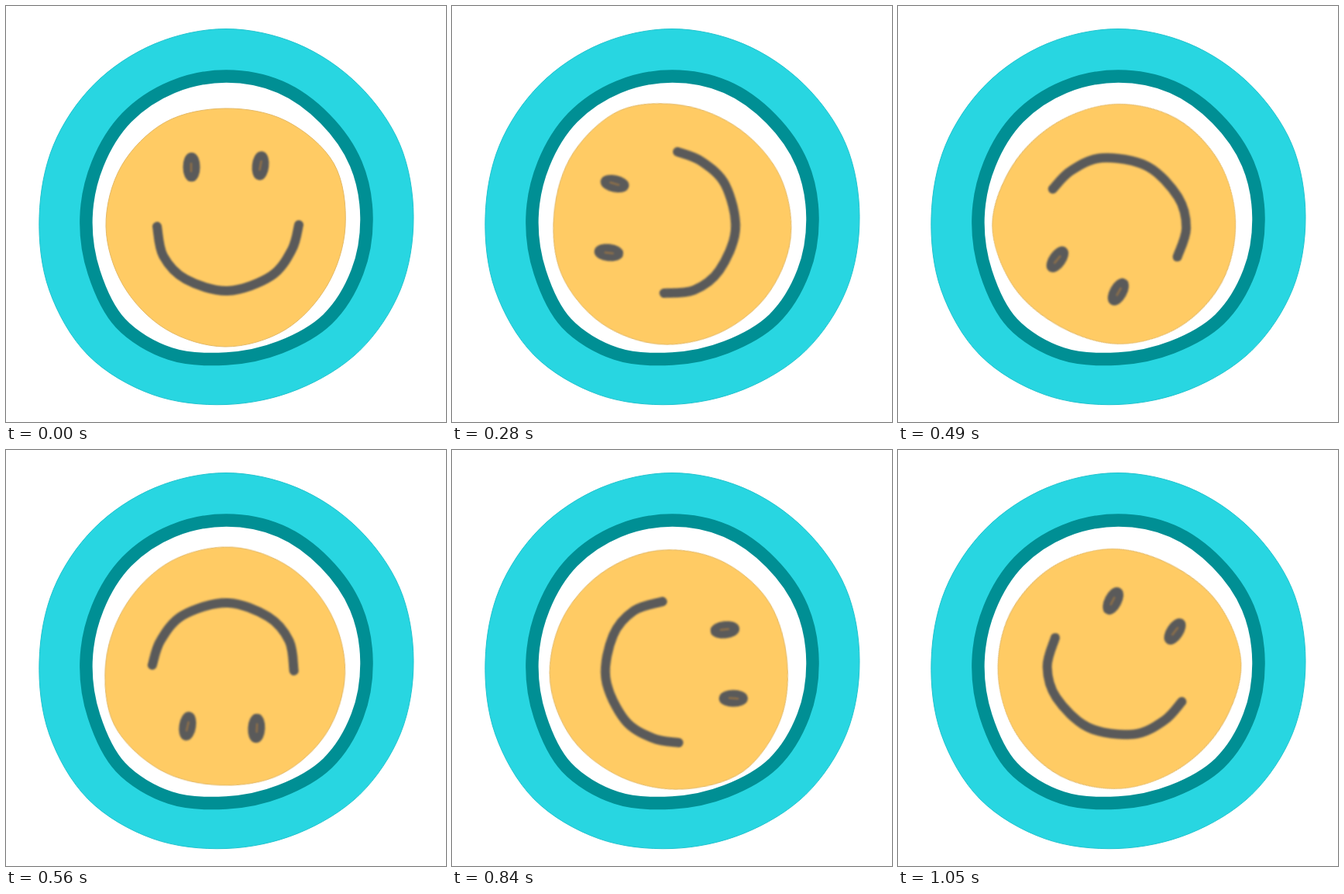
These frames come from a looping animation (568x536 px, 1120 ms). An HTML page:

```html
<!DOCTYPE html>
<html lang="en">
<head>
<meta charset="utf-8">
<title>Rolling smiley</title>
<style>
  html, body { margin: 0; width: 100%; height: 100%; overflow: hidden; background: #fff; }
  svg { display: block; }
  .soft { filter: blur(.8px); }
  #mouth, .eye { fill: none; stroke: #5a5a5a; stroke-width: 12; stroke-linecap: round; stroke-linejoin: round; }
  .eye { fill: #5a5a5a; stroke-width: 10.5; }
  .glint { fill: none; stroke: #8f7049; stroke-width: 2.6; stroke-linecap: round; }
  #face { animation: roll 1120ms infinite; }

  /* key poses of the wobbling turn; each stretch is held in 70 ms steps */
  @keyframes roll {
    0%     { transform: translate(283px, 284px) rotate(0deg); animation-timing-function: steps(2); }
    12.5%  { transform: translate(282.2px, 284.1px) rotate(-30.7deg); animation-timing-function: steps(2); }
    25%    { transform: translate(283px, 282.5px) rotate(-83.9deg); animation-timing-function: steps(3); }
    43.75% { transform: translate(283.7px, 280.4px) rotate(-150.8deg); animation-timing-function: steps(3); }
    62.5%  { transform: translate(284px, 279.2px) rotate(-229.6deg); animation-timing-function: steps(2); }
    75%    { transform: translate(280.8px, 282.8px) rotate(-275.9deg); animation-timing-function: steps(3); }
    93.75% { transform: translate(281.1px, 282.3px) rotate(-332.6deg); animation-timing-function: steps(1); }
    100%   { transform: translate(283px, 284px) rotate(-360deg); }
  }
</style>
</head>
<body>
<svg width="568" height="536" viewBox="0 0 568 536">
  <path id="rim" fill="#28d6e1" stroke="#20c3ce"/>
  <path id="band" fill="#fff" stroke="#008f94" stroke-width="16.5"/>
  <g id="face">
    <path id="skin" fill="#ffcb64" stroke="#e3b865"/>
    <g class="soft" transform="translate(-283 -284)">
      <path id="mouth"/>
      <ellipse class="eye" cx="239.5" cy="207.5" rx="5.8" ry="13.6"/>
      <ellipse class="eye" cx="328.5" cy="205.8" rx="5.6" ry="13.4" transform="rotate(6 328.5 205.8)"/>
      <path class="glint" d="M239 203V213M329.5 200L327.5 211"/>
    </g>
  </g>
</svg>
<script>
  // Smooth curve through the points (Catmull-Rom as cubic Béziers)
  function curve(pts, closed) {
    const n = pts.length;
    const at = i => closed ? pts[(i + n) % n] : pts[Math.max(0, Math.min(n - 1, i))];
    let d = 'M' + pts[0];
    for (let i = 0; i < (closed ? n : n - 1); i++) {
      const [a, b, c, e] = [at(i - 1), at(i), at(i + 1), at(i + 2)];
      const out = [0, 1].map(k => b[k] + (c[k] - a[k]) / 6);
      const into = [0, 1].map(k => c[k] - (e[k] - b[k]) / 6);
      d += `C${out} ${into} ${c}`;
    }
    return d + (closed ? 'Z' : '');
  }

  function draw(id, pts, closed) {
    document.getElementById(id).setAttribute('d', curve(pts, closed));
  }

  // Hand-drawn circle: offsets from radius r, evenly spaced clockwise from the right
  function blob(id, cx, cy, r, offsets) {
    draw(id, offsets.map((o, i) => {
      const a = i / offsets.length * 2 * Math.PI;
      return [cx + (r + o) * Math.cos(a), cy + (r + o) * Math.sin(a)];
    }), true);
  }

  blob('rim', 284, 271.5, 241, [1, 3, 3, 0, 1, 7, 11, 6, 0, 0, 0, 0, 1, 0, 0, 2]);
  blob('band', 284.5, 272.5, 181, [0, 2, 4, 0, 1, 9, 12, 4, 0, -1, 1, 1, 1, 1, -1, 0]);
  blob('skin', 0, 0, 154, [1, -2, 0, 1, -1, -2, 0, 1, 1, -2, 3, 8]);
  draw('mouth', [[195, 284], [203, 322], [232, 352], [286, 367], [342, 348], [369, 314], [378, 282]], false);
</script>
</body>
</html>
```
